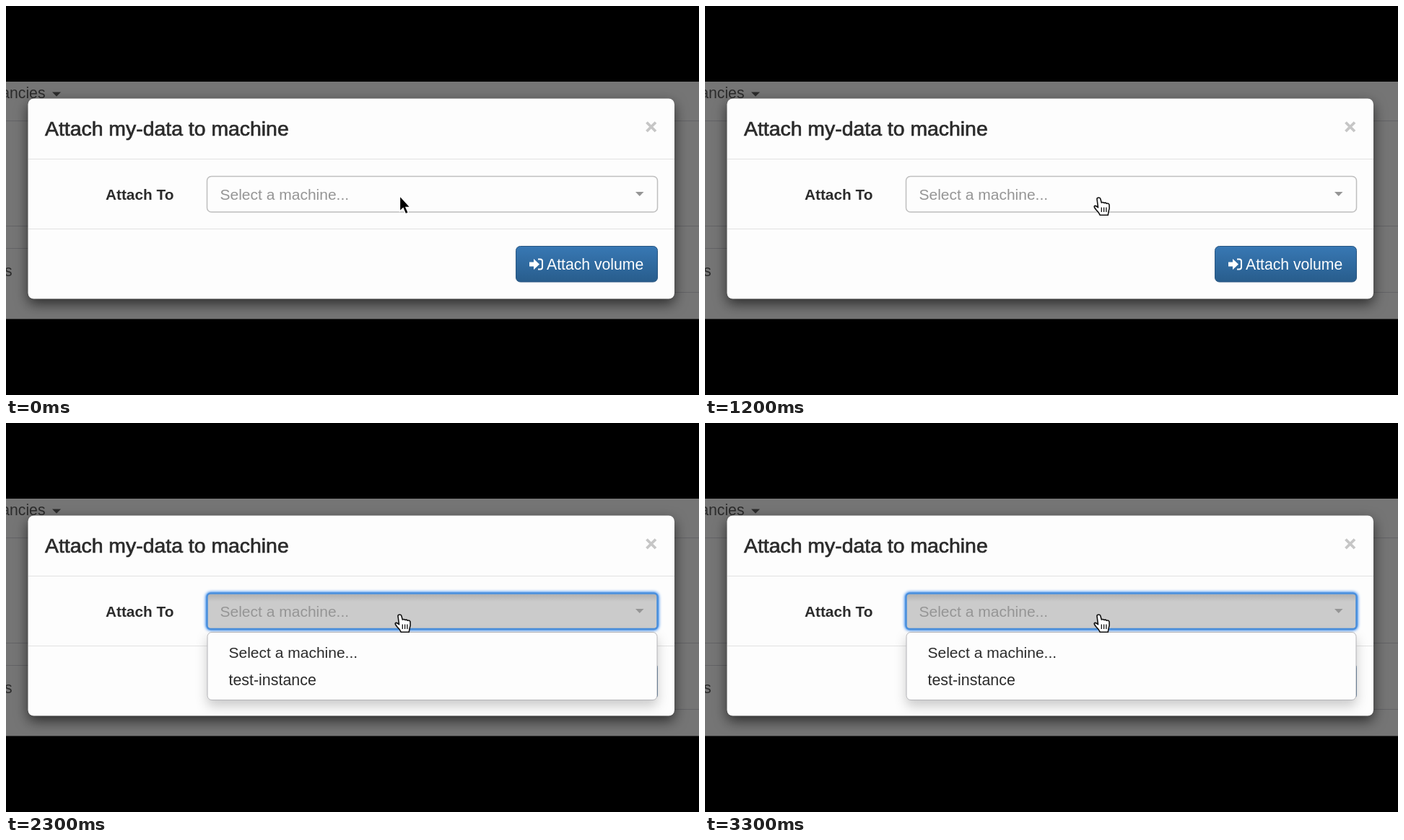
Write an HTML page that moves like this. It is 960 px wide and 540 px high and loops after 3.4 s.

```html
<!DOCTYPE html>
<html lang="en">
<head>
<meta charset="utf-8">
<title>Attach a volume</title>
<style>
  html, body { margin: 0; width: 100%; height: 100%; overflow: hidden; background: #000; }
  svg { display: block; font: 21.2px "Liberation Sans", Arial, sans-serif; fill: #2b2b2b; }
  .modal { fill: #fdfdfd; filter: drop-shadow(0 7px 9px rgba(0, 0, 0, .62)); }
  .rule { stroke: #e2e2e2; }
  .field { fill: #fdfdfd; stroke: #bfbfbf; stroke-width: 1.5; }
  .muted { fill: #959595; }
  .focus { fill: #cbcbcb; stroke: #4a8fdc; stroke-width: 2.5; filter: drop-shadow(0 0 2px #5c9ff0) drop-shadow(0 0 1px #5c9ff0); }
  .menu { fill: #fdfdfd; stroke: #b4b4b8; filter: drop-shadow(0 8px 8px rgba(0, 0, 0, .2)); }
  .white { fill: #fff; }
</style>
</head>
<body>
<svg width="960" height="540" viewBox="0 0 960 540">
  <defs>
    <linearGradient id="blue" x2="0" y2="1">
      <stop stop-color="#3878b4"/>
      <stop offset="1" stop-color="#285d8c"/>
    </linearGradient>
    <linearGradient id="inset" x2="0" y2="1">
      <stop stop-color="#555" stop-opacity=".22"/>
      <stop offset="1" stop-color="#555" stop-opacity="0"/>
    </linearGradient>
  </defs>

  <!-- dimmed page -->
  <rect y="105" width="960" height="329.5" fill="#757575"/>
  <path d="M0 159.5H960M0 305.5H960M0 336.5H480M480 397.5H960" stroke="#636366"/>
  <text x="54.5" y="128" text-anchor="end">Tenancies</text>
  <path d="M64 119.5h12l-6 6z"/>
  <text x="8.5" y="375" text-anchor="end">s</text>

  <!-- dialog -->
  <rect class="modal" x="30.5" y="128.5" width="895.5" height="278" rx="8"/>
  <path class="rule" d="M31 212.5H926M31 309.5H926"/>
  <text x="54" y="180" font-size="28.4" stroke="#2b2b2b" stroke-width=".7">Attach my-data to machine</text>
  <path d="M887.5 161.5l12.5 12.5m0-12.5l-12.5 12.5" stroke="#c6c6c6" stroke-width="3.8"/>
  <text x="138" y="268.5" font-size="20.8" font-weight="bold">Attach To</text>

  <rect x="706.5" y="333.5" width="196" height="49.5" rx="6" fill="url(#blue)" stroke="#285580"/>
  <path class="white" d="M725 355.5h6v-4.5l8 7.5-8 7.5v-4.5h-6z"/>
  <path d="M737 351.5h3q3 0 3 3v8q0 3-3 3h-3" fill="none" stroke="#fff" stroke-width="2"/>
  <text class="white" x="749" y="366">Attach volume</text>

  <rect class="field" x="278.5" y="236.5" width="624" height="49.5" rx="6"/>
  <g class="open">
    <rect class="focus" x="278.5" y="236.5" width="624" height="49.5" rx="5"/>
    <rect x="280" y="238" width="621" height="10" rx="3" fill="url(#inset)"/>
  </g>
  <g class="muted">
    <text x="296.5" y="268.5" font-size="21">Select a machine...</text>
    <path d="M872 258h11.5l-5.75 6z"/>
  </g>

  <g class="open">
    <rect class="menu" x="279" y="290.5" width="623" height="94" rx="6"/>
    <text x="308.5" y="325.5" font-size="21">Select a machine...</text>
    <text x="308.5" y="364" font-size="21.4">test-instance</text>
  </g>

  <!-- pointers -->
  <path id="arrow" stroke="#fff" stroke-width="1.3" fill="#000"
    d="M545.5 263.5v21.5l4.6-4.3 3.4 8 3.8-1.6-3.4-7.8h6z"/>
  <g id="hand" stroke="#111" stroke-width="1.6" stroke-linejoin="round">
    <path class="white" d="M543 268q0-2 2.3-2 2.2 0 2.6 2l1.4 5q2-1.2 3.6.4 2.2-.9 3.4.8 2.800-.8 3.700 1.600.6 5-.8 9l-1 5.500h-11q-1.500-4-5-7-3-3.200-3-5 1-2.200 4.300.6l1 .8z"/>
    <path d="M549.3 279.5v6.5m3.3-6.5v6.5m3.3-6.5v6.5" stroke-width="1.3"/>
  </g>
</svg>
<script>
  const LOOP = 3400, HOVER = 100, OPEN = 2000;
  const $ = id => document.getElementById(id);
  const popups = document.querySelectorAll(".open");
  const show = (el, on) => el.style.display = on ? "" : "none";

  function draw(now) {
    const t = now % LOOP;
    show($("arrow"), t < HOVER);
    show($("hand"), t >= HOVER);
    popups.forEach(el => show(el, t >= OPEN));
  }

  const start = performance.now();
  function tick() {
    draw(performance.now() - start);
    requestAnimationFrame(tick);
  }
  tick();
</script>
</body>
</html>
```
